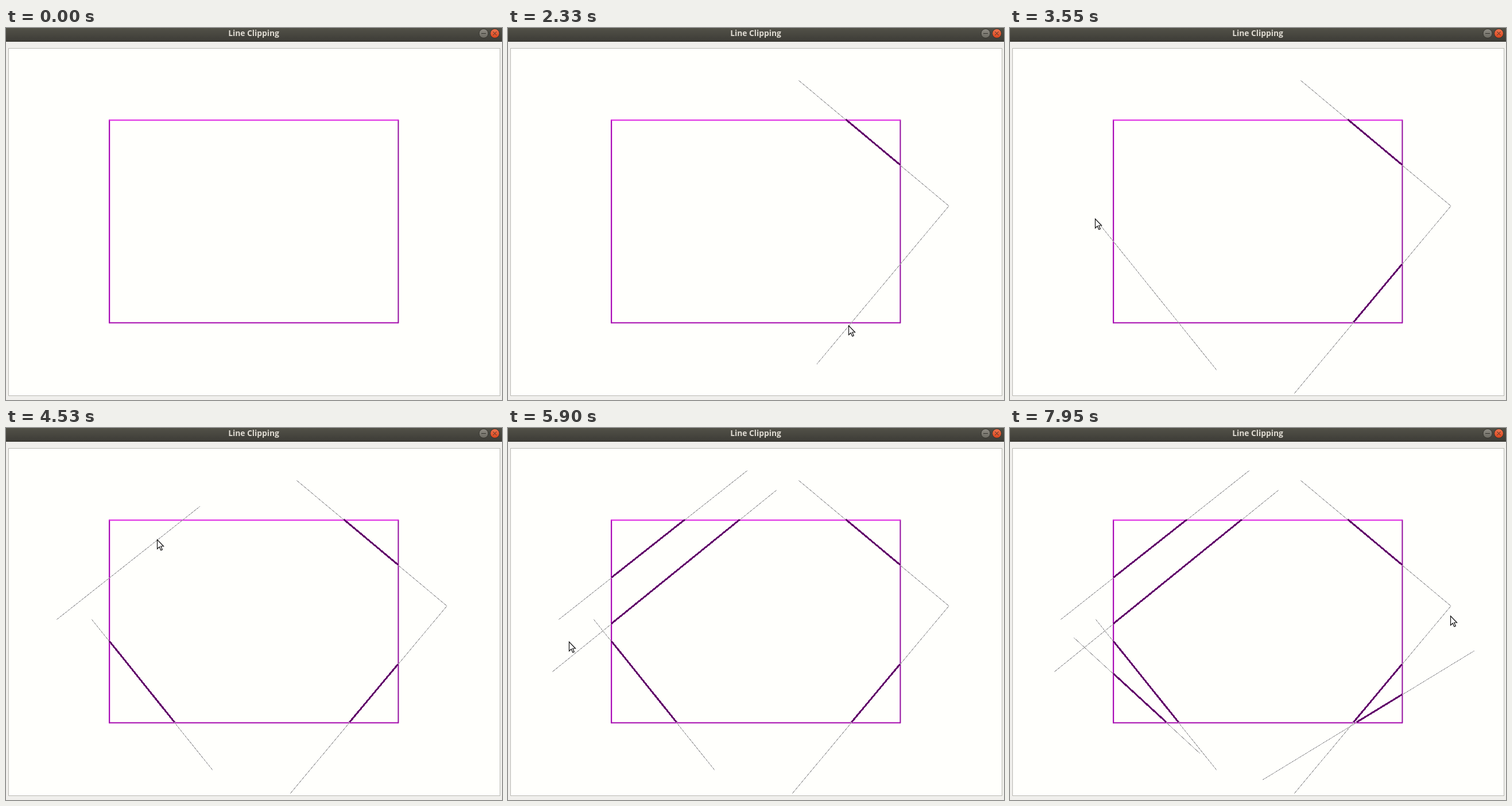
These frames come from a looping animation (864 by 648 pixels, 8000 ms). An HTML page:

```html
<!DOCTYPE html>
<html lang="en">
<head>
<meta charset="utf-8">
<title>Line Clipping</title>
<style>
  html, body { margin: 0; width: 100%; height: 100%; overflow: hidden; background: #f0efec; }
  svg { display: block; }
  .title { font: bold 13.8px "Open Sans", "Noto Sans", sans-serif; fill: #dfdbd2; text-anchor: middle; }
  .thin { stroke: #a4a4a4; stroke-width: 1; shape-rendering: crispEdges; }
  .thick { stroke: #62006a; stroke-width: 3; shape-rendering: crispEdges; transform: translateY(-.6px); }
</style>
</head>
<body>
<svg width="864" height="648" viewBox="0 0 864 648">
  <defs>
    <linearGradient id="bar" x2="0" y2="1">
      <stop offset="0" stop-color="#525148"/>
      <stop offset="1" stop-color="#3c3b36"/>
    </linearGradient>
    <linearGradient id="gray" x2="0" y2="1">
      <stop offset="0" stop-color="#8f8c84"/>
      <stop offset="1" stop-color="#6c6a62"/>
    </linearGradient>
    <linearGradient id="red" x2="0" y2="1">
      <stop offset="0" stop-color="#f0754f"/>
      <stop offset="1" stop-color="#d9441c"/>
    </linearGradient>
  </defs>

  <rect width="864" height="648" fill="#f0efec"/>
  <rect width="864" height="24" fill="url(#bar)"/>
  <text class="title" x="431.5" y="14">Line Clipping</text>
  <g stroke="#33322d">
    <circle cx="832" cy="9.5" r="8" fill="url(#gray)"/>
    <path d="M828 9.5h8"/>
    <circle cx="851.5" cy="9.5" r="8" fill="url(#red)"/>
    <path d="M848.5 6.5l6 6m0-6l-6 6"/>
  </g>
  <rect x="4.5" y="35.5" width="856" height="605" fill="#fffffc" stroke="#b9b9b4"/>

  <g fill="none" stroke-width="2" stroke-linecap="round">
    <path d="M181.5 161v352" stroke="#f3c4f5" stroke-width="1"/>
    <path d="M180 160.5v353" stroke="#a80cb4"/>
    <path d="M683.4 160.5v353" stroke="#930f9e"/>
    <path d="M180 160.5h503" stroke="#dd1fe2"/>
    <path d="M180 513.4h503" stroke="#a505ae"/>
  </g>
  <g id="lines"></g>
  <path id="cursor" d="M.5.5V16.5L4.2 13L6.8 19L9.3 18L6.7 12H11.5Z" fill="#fff" stroke="#111" stroke-width="1.2"/>
</svg>

<script>
const LOOP = 8000;
const LAG = 75; // the pointer image trails the line tip
const BOX = { left: 180, top: 160, right: 683, bottom: 513 };
const ENTRY = [542, -52];

// Each line is dragged from a to b; it is clipped when the drag ends.
// "hop" is the pointer's way to a, "rest" a pause at b before release.
const strokes = [
  { hop: [630, 930], drag: [1200, 1450], a: [506, 91], b: [768, 310] },
  { drag: [2030, 2550], rest: 90, a: [768, 310], b: [495, 637] },
  { hop: [2750, 3050], drag: [3300, 3680], rest: 130, a: [360, 596], b: [149, 333] },
  { hop: [3850, 4080], drag: [4300, 4680], a: [88, 334], b: [417, 74] },
  { hop: [4850, 4980], drag: [5250, 5630], a: [468, 108], b: [77, 425] },
  { hop: [5900, 6030], drag: [6330, 6630], a: [111, 365], b: [331, 567] },
  { hop: [6930, 7030], drag: [7280, 7650], a: [440, 613], b: [809, 388] }
];
const exit = { hop: [7830, 7950], a: [768, 328] };

const cursor = document.getElementById("cursor");
const lines = document.getElementById("lines");

const clamp = v => Math.min(1, Math.max(0, v));
const mix = (p, q, u) => p.map((v, i) => v + (q[i] - v) * u);

function addLine(name) {
  const el = document.createElementNS("http://www.w3.org/2000/svg", "line");
  el.setAttribute("class", name);
  lines.append(el);
  return el;
}

function setLine(el, [x1, y1], [x2, y2]) {
  Object.entries({ x1, y1, x2, y2 }).forEach(([k, v]) => el.setAttribute(k, v));
}

function show(el, on) {
  el.setAttribute("visibility", on ? "visible" : "hidden");
}

// Liang-Barsky
function clip([x, y], [x2, y2]) {
  const dx = x2 - x, dy = y2 - y;
  let lo = 0, hi = 1;
  for (const [p, q] of [[-dx, x - BOX.left], [dx, BOX.right - x], [-dy, y - BOX.top], [dy, BOX.bottom - y]]) {
    if (p < 0) lo = Math.max(lo, q / p);
    else if (p > 0) hi = Math.min(hi, q / p);
  }
  return [lo, hi].map(s => [x + s * dx, y + s * dy]);
}

function dragAt({ drag: [from, to], rest = 0, a, b }, t) {
  return mix(a, b, clamp((t - from) / (to - rest - from)) ** 1.25);
}

// About ten jumps a second, slowing down; the first comes at once
function hopAt([from, to], start, end, t) {
  const gaps = Math.round((to - from) / 100);
  const step = Math.floor(clamp((t - from) / (to - from)) * gaps + 1e-6);
  return mix(start, end, 1 - (1 - (step + 1) / (gaps + 1)) ** 3);
}

function pointer(t) {
  let place = null, last = ENTRY;
  for (const s of [...strokes, exit]) {
    if (s.hop && t >= s.hop[0]) place = hopAt(s.hop, last, s.a, t);
    if (s.drag && t >= s.drag[0]) place = dragAt(s, t);
    last = s.b;
  }
  return place;
}

for (const s of strokes) {
  s.thin = addLine("thin");
  s.thick = addLine("thick");
  setLine(s.thick, ...clip(s.a, s.b));
}

function draw(time) {
  // 40 pictures a second, on times ending in 00, 30, 50 and 80
  const rest = time % 50;
  const t = Math.round(time - rest) + (rest >= 30 ? 30 : 0);
  for (const s of strokes) {
    show(s.thin, t >= s.drag[0]);
    show(s.thick, t >= s.drag[1]);
    setLine(s.thin, s.a, dragAt(s, t + LAG));
  }
  const p = pointer(t);
  show(cursor, p);
  if (p) cursor.setAttribute("transform", `translate(${Math.round(p[0]) - 1} ${Math.round(p[1]) - 1})`);
}

const begin = performance.now();
function tick() {
  draw((performance.now() - begin) % LOOP);
  requestAnimationFrame(tick);
}
tick();
</script>
</body>
</html>
```
